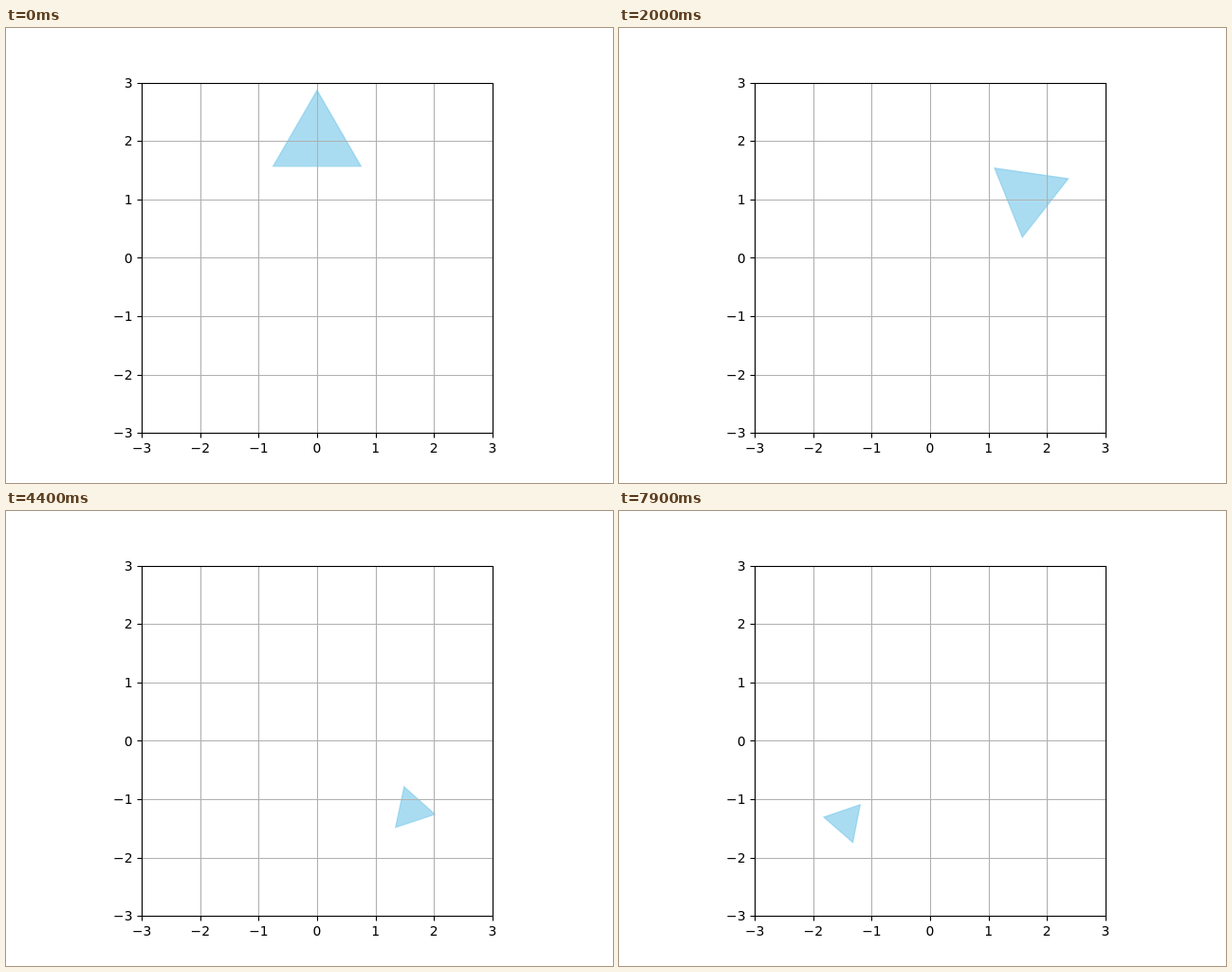
Animation of 640 by 480 pixels, one loop 8 s. Source, as an HTML page with a canvas:

```html
<!DOCTYPE html>
<html lang="en">
<head>
<meta charset="utf-8">
<title>Orbiting triangle</title>
<style>
  html, body { margin: 0; width: 100%; height: 100%; overflow: hidden; background: #fff; }
  canvas { display: block; }
</style>
</head>
<body>
<canvas id="stage" width="640" height="480"></canvas>
<script>
const ctx = document.getElementById('stage').getContext('2d');

const UNIT = 61.6, CX = 328, CY = 242.4, LINE = 1.11;
const STEP_MS = 100, STEPS = 80, STEP_ANGLE = 0.05;
const TICKS = [-3, -2, -1, 0, 1, 2, 3];

const px = x => CX + x * UNIT;
const py = y => CY - y * UNIT;
const snap = v => Math.round(v) + 0.5;

const LEFT = snap(px(-3)), RIGHT = snap(px(3));
const TOP = snap(py(3)), BOTTOM = snap(py(-3));

function line(x1, y1, x2, y2) {
  ctx.beginPath();
  ctx.moveTo(x1, y1);
  ctx.lineTo(x2, y2);
  ctx.stroke();
}

function drawGrid() {
  ctx.strokeStyle = '#b0b0b0';
  ctx.lineWidth = LINE;
  for (const n of TICKS) {
    line(snap(px(n)), TOP, snap(px(n)), BOTTOM);
    line(LEFT, snap(py(n)), RIGHT, snap(py(n)));
  }
}

function drawAxes() {
  ctx.strokeStyle = ctx.fillStyle = '#000';
  ctx.lineWidth = LINE;
  ctx.strokeRect(LEFT, TOP, RIGHT - LEFT, BOTTOM - TOP);
  ctx.font = '13.89px "DejaVu Sans", sans-serif';
  ctx.textBaseline = 'alphabetic';
  for (const n of TICKS) {
    const x = snap(px(n)), y = snap(py(n));
    const label = String(n).replace('-', '\u2212');
    line(x, BOTTOM, x, BOTTOM + 5);
    line(LEFT - 5, y, LEFT, y);
    ctx.textAlign = 'center';
    ctx.fillText(label, px(n), 448);
    ctx.textAlign = 'right';
    ctx.fillText(label, 133.5, Math.round(py(n) + 5.2));
  }
}

// The triangle circles the origin, spins three times as fast and breathes.
function drawTriangle(angle) {
  const x = 2 * Math.sin(angle), y = 2 * Math.cos(angle);
  const radius = (1 + 0.5 * Math.cos(angle)) / Math.sqrt(3);
  ctx.beginPath();
  for (let i = 0; i < 3; i++) {
    const a = Math.PI / 2 + 3 * angle + i * 2 * Math.PI / 3;
    ctx.lineTo(px(x + radius * Math.cos(a)), py(y + radius * Math.sin(a)));
  }
  ctx.closePath();
  ctx.fillStyle = ctx.strokeStyle = 'rgba(135, 206, 235, 0.7)';
  ctx.lineWidth = 1.39;
  ctx.fill();
  ctx.stroke();
}

function draw(time) {
  const step = Math.floor(time / STEP_MS) % STEPS;
  ctx.fillStyle = '#fff';
  ctx.fillRect(0, 0, 640, 480);
  drawTriangle(step * STEP_ANGLE);
  drawGrid();
  drawAxes();
}

const start = performance.now();
function tick() {
  draw(performance.now() - start);
  requestAnimationFrame(tick);
}
tick();
</script>
</body>
</html>
```
